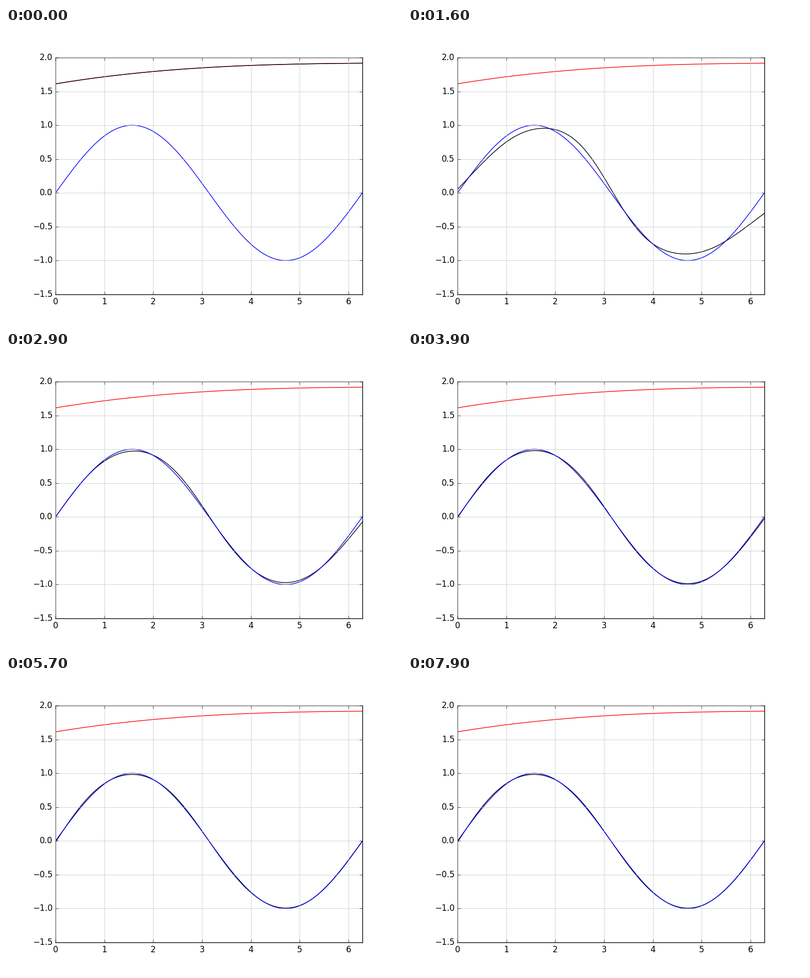
A matplotlib script that plays this animation: 800x600 px, repeating every 8000 ms.

```python
import matplotlib.pyplot as plt
import numpy as np
from matplotlib.animation import FuncAnimation

plt.style.use("classic")
plt.rcParams["text.kerning_factor"] = 6

FRAMES, STEP = 80, 100
END = 2 * np.pi
x = np.linspace(0, END, 100)


def curve(start, end, *waves):
    """Straight line from start to end plus half-period sine harmonics."""
    line = start + (end - start) * x / END
    return line + sum(a * np.sin(k * x / 2) for k, a in enumerate(waves, 1))


target = np.sin(x)
guess = 1.612 + 0.1196 * x - 0.01567 * x**2 + 0.000695 * x**3
step = -0.75 * np.tanh(0.6 * (x - 3.1))

# Error that fades with training, and the small one that stays
slow = curve(0.05, -0.3, 0.193, -0.138, 0.012, -0.091, 0, 0.027, 0, -0.011)
rest = curve(-0.018, 0, 0.011, 0.007, 0.005, 0.003, 0.006, 0.014, 0.005)


def fit(frame):
    if frame == 0:
        return guess
    t = frame * STEP
    fade = min(np.exp((1600 - t) / 938), 2.2)
    early = np.exp((STEP - t) / 250)
    return early * step + (1 - early) * (target + fade * slow + rest * (1 - min(fade, 1)))


fig = plt.figure(figsize=(8, 6), dpi=100, facecolor="white")
ax = fig.add_axes([0.125, 0.1, 0.775, 0.8])
ax.set_xlim(0, END)
ax.set_ylim(-1.5, 2)
ax.set_xticks(range(7))
ax.set_yticks(np.arange(-1.5, 2.1, 0.5))
ax.grid(True, linestyle="-", color="0.75", linewidth=0.5)

ax.plot(x, guess, "r")
fit_line, = ax.plot(x, guess, "k")
ax.plot(x, target, "b")


def update(frame):
    fit_line.set_ydata(fit(frame))
    return fit_line,


anim = FuncAnimation(fig, update, frames=FRAMES, interval=STEP,
                     init_func=lambda: update(0), repeat=True, repeat_delay=0)
plt.show()
```
